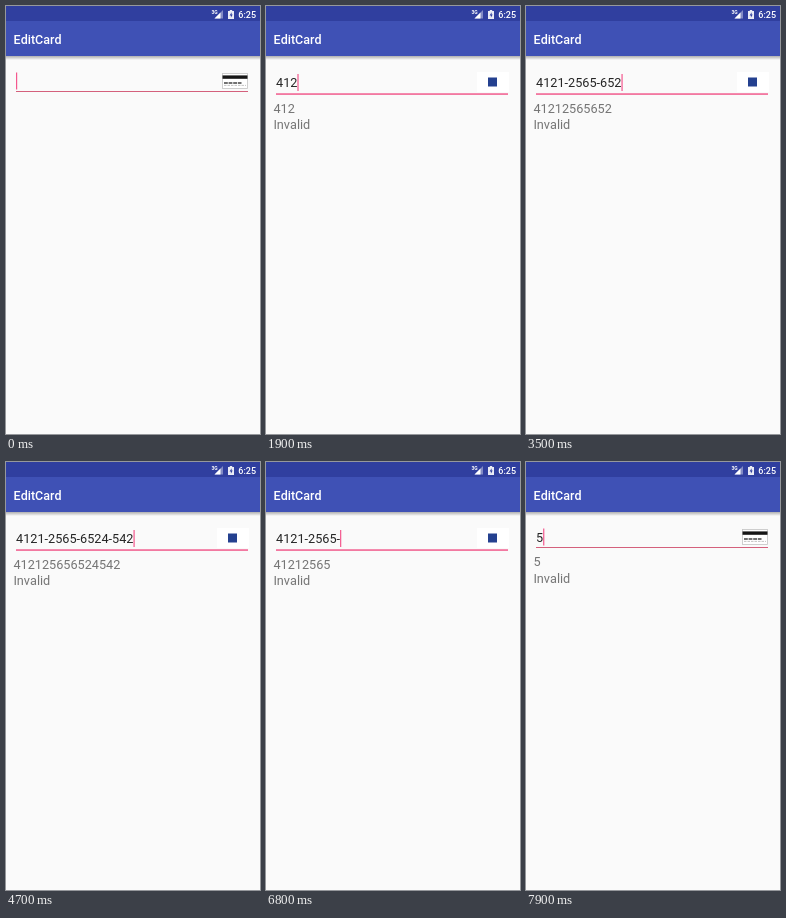
An HTML page for the animation above (8 s loop, 254 px wide and 428 px high).

```html
<!DOCTYPE html>
<html lang="en">
<head>
<meta charset="utf-8">
<title>Card field</title>
<style>
  html, body { margin: 0; width: 100%; height: 100%; overflow: hidden; background: #fafafa; }
  svg { display: block; width: 100vw; height: 100vh; }
  text { font-family: Roboto, "Noto Sans", sans-serif; font-size: 12.7px; font-kerning: none; white-space: pre; }
  .bar { fill: #fff; font-weight: 500; }
  .info { fill: #757575; }
</style>
</head>
<body>
<svg viewBox="0 0 254 428" preserveAspectRatio="none">
  <defs>
    <linearGradient id="shade" x2="0" y2="1">
      <stop offset="0" stop-color="#000" stop-opacity=".3"/>
      <stop offset="1" stop-color="#000" stop-opacity="0"/>
    </linearGradient>
  </defs>
  <rect width="254" height="428" fill="#fafafa"/>
  <rect y="50" width="254" height="4" fill="url(#shade)"/>
  <rect width="254" height="50" fill="#3f51b5"/>
  <rect width="254" height="15" fill="#303f9f"/>

  <!-- status bar -->
  <text class="bar" x="205.5" y="7.8" style="font-size:5px;font-weight:700">3G</text>
  <path d="M217 4V12.5H208.5Z" fill="#fff" fill-opacity=".4"/>
  <path d="M214.5 6.5V12.5H208.5Z" fill="#fff"/>
  <path d="M223.8 4H226.2V5H228V13H222V5H223.8Z" fill="#fff" fill-opacity=".9"/>
  <path d="M225.6 6.2L223.6 9.4H224.9V11.8L226.7 8.6H225.6Z" fill="#303f9f"/>
  <text class="bar" x="250" y="11.8" text-anchor="end" style="font-size:9px">6:25</text>
  <text class="bar" x="7.6" y="38" style="font-size:12.5px">EditCard</text>

  <!-- card icons -->
  <g id="blank">
    <rect x="216.5" y="67.5" width="25" height="15" fill="#fff" stroke="#c4c4c4" stroke-width=".8"/>
    <rect x="216.5" y="69.4" width="25" height="3.4" fill="#161616"/>
    <path d="M218 77H235.5" stroke="#444" stroke-width="1.5" stroke-dasharray="3.8 .8"/>
    <path d="M218 79.4H240" stroke="#b5b5b5" stroke-width=".8" stroke-dasharray="2.5 1"/>
  </g>
  <g id="brand">
    <rect x="211" y="66" width="32" height="20" fill="#fff"/>
    <rect x="222" y="71.5" width="9" height="9" fill="#24408f"/>
  </g>

  <!-- field -->
  <rect id="line" x="10" width="232"/>
  <text id="field" x="10" fill="#262626"></text>
  <rect id="caret" width="1.2" fill="#f4588e"/>
  <text id="number" class="info" x="7.4"></text>
  <text id="verdict" class="info" x="7.4"></text>
</svg>
<script>
  const LOOP = 8000;
  const CARD = "4121-2565-6524-5425";

  // [time, characters typed]
  const KEYS = [
    [0, 0], [1400, 1], [1600, 2], [1900, 3], [2100, 4], [2200, 5], [2300, 6],
    [2700, 8], [2900, 10], [3100, 12], [3500, 13], [3700, 15], [3900, 16],
    [4100, 17], [4700, 18], [4900, 19], [6100, 18], [6600, 15], [6700, 13],
    [6800, 10], [6900, 7], [7000, 3], [7100, 0]
  ];
  const CARET_OFF = [[500, 900], [5500, 5900], [7700, 7900]];

  const el = id => document.getElementById(id);
  const set = (id, attrs) => {
    for (const name in attrs) el(id).setAttribute(name, attrs[name]);
  };
  const within = (t, [from, to]) => t >= from && t < to;
  const show = (id, on) => set(id, { visibility: on ? "visible" : "hidden" });

  function typedAt(t) {
    if (t >= 7900) return "5";
    let count = 0;
    for (const [time, n] of KEYS) if (t >= time) count = n;
    return CARD.slice(0, count);
  }

  function draw(t) {
    const typed = typedAt(t);
    const digits = typed.replace(/-/g, "");
    const tall = within(t, [1500, 7100]);
    const valid = /^4\d{12}(\d{3})?$/.test(digits);

    show("brand", tall);
    show("blank", !tall);
    set("line", tall
      ? { y: 87.4, height: 1.3, fill: "#f0437c" }
      : { y: 85, height: 1, fill: "#d4607c" });

    el("field").textContent = typed;
    set("field", { y: tall ? 81.4 : 80.2 });
    el("number").textContent = digits;
    set("number", { y: tall ? 106.6 : 104.2 });
    el("verdict").textContent = t < 1400 ? "" : valid ? "Valid" : "Invalid";
    set("verdict", { y: tall ? 123.4 : 121.2 });

    const end = typed ? el("field").getComputedTextLength() : 0;
    set("caret", { x: 10 + end, y: tall ? 68 : 66.5, height: 17 });
    show("caret", !CARET_OFF.some(span => within(t, span)));
  }

  const start = performance.now();
  function tick() {
    draw((performance.now() - start) % LOOP);
    requestAnimationFrame(tick);
  }
  tick();
</script>
</body>
</html>
```
